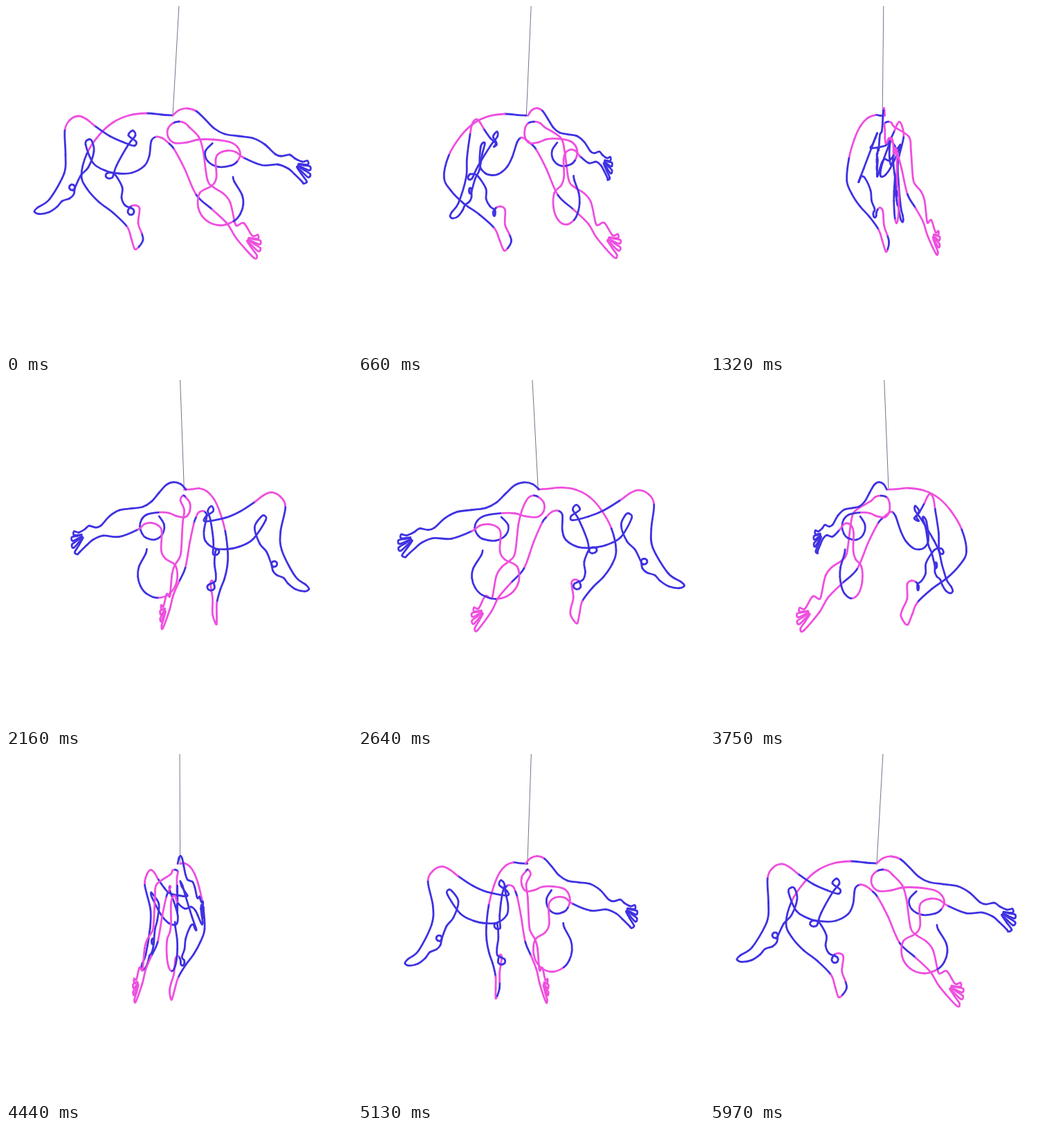
Recreate the animation shown at these times as an HTML page with a canvas. Size 500 px wide and 500 px high, loop 6000 ms.

```html
<!DOCTYPE html>
<html>
<head>
<meta charset="utf-8">
<style>
html, body { margin: 0; width: 100%; height: 100%; overflow: hidden; background: #fff; }
canvas { display: block; }
</style>
</head>
<body>
<canvas id="stage" width="500" height="500"></canvas>
<script>
const ctx = document.getElementById('stage').getContext('2d');
const LOOP = 6000, AXIS = 251, SWAY = 0.056;
const BLUE = '#4032e2', PINK = '#ef4fdf', ROPE = '#77738c';

// Colours seen from the front and from behind
const blue = [BLUE, BLUE], pink = [PINK, PINK];
const bluePink = [BLUE, PINK], pinkBlue = [PINK, BLUE];

// Each limb lies in a plane: its depth follows from its place in the front view.
const belly = x => Math.min(0, 0.26 * (x - 215));
const farLeg = (x, y) => 0.36 * (x - 155) + 0.14 * (y - 299) - 3;
const farAnkle = x => 0.7 * (181 - x);
const knees = (x, y) => 0.2 * (180 - x) + 0.4 * (190 - y);
const nearThigh = x => 61 - 0.5 * (x - 85);
const nearShin = x => 48 - 0.36 * (x - 99);
const nearAnkle = x => 49 - 0.5 * (x - 95);
const underThigh = (x, y) => 43 - 0.354 * (x - 127) - 0.4 * (y - 203);
const nearArm = x => 0.32 * (x - 180);
const ribs = x => 0.4 * (x - 233);
const torso = x => 5 - 0.07 * (x - 235);
const farArm = x => 0.25 * (255 - x);
const farForearm = x => 0.47 * (343 - x) - 2;
const face = x => 0.3 * (338 - x) - 1;

const wires = [];

function line(color, depth, ...xy) {
  const wire = wires[wires.length - 1];
  for (let i = 0; i < xy.length; i += 2) {
    const x = xy[i] - AXIS;
    wire.push({ x, y: xy[i + 1] - SWAY * x, z: depth(xy[i], xy[i + 1]), color });
  }
}

// Part of an ellipse, angles in degrees
function arc(color, depth, cx, cy, rx, ry, from, to) {
  const steps = Math.ceil(Math.abs(to - from) / 45);
  for (let i = 0; i <= steps; i++) {
    const a = (from + (to - from) * i / steps) * Math.PI / 180;
    line(color, depth, cx + rx * Math.cos(a), cy + ry * Math.sin(a));
  }
}

// Four fingers fanned out around the palm, the thumb first
function hand(color, depth, px, py, thumbLast) {
  const points = [];
  const add = (r, a) => points.push([px + r * Math.cos(a), py + r * Math.sin(a)]);
  for (let k = 0; k < 4; k++) {
    const angle = 0.36 * k - 0.03, length = 20 + 4.2 * k, half = 2.8 / length;
    add(length * 0.6, angle - half);
    add(length, angle - half);
    add(length, angle + half);
    if (k < 3) add(7, angle + 0.18);
  }
  if (thumbLast) points.reverse();
  for (const p of points) line(color, depth, ...p);
}

// Belly, legs, near arm, chest and head in one line
wires.push([]);
line(bluePink, belly, 241,158, 225,157, 203,155);
line(pink, belly, 178,158, 155,168, 135,186, 117,213);
line(blue, farLeg, 109,245, 117,264, 134,283, 155,299, 175,319);
line(pink, farLeg, 181,336, 186,351, 192,348);
line(bluePink, farLeg, 198,338, 196,328);
line(pink, farLeg, 191,314, 193,293, 187,288, 180,290);
arc(blue, farAnkle, 180.5,297, 4.5,4.8, 200,-80);
line(blue, farLeg, 172,288, 167,277, 168,262, 157,243);
arc(blue, knees, 149.5,245, 5.5,4.2, 250,0);
line(blue, knees, 160,230, 177,200, 187,187, 183,180, 177,187, 188,196, 185,202);
line(blue, nearThigh, 170,197, 150,188, 128,173);
line(pink, nearThigh, 117,164, 105,159, 92,165, 85,180);
line(blue, nearShin, 86,215, 84,242, 63,279, 46,291, 41,297, 48,300.5, 62,298,
  74,290, 81,282, 92,278, 98,272);
arc(blue, nearAnkle, 95.5,262, 4,4, 20,-320);
line(blue, nearShin, 108,245, 119,233, 127,210);
line(blue, underThigh, 124,195, 119,193, 115,200, 126,227, 144,238, 163,242, 182,241,
  200,231, 207,217, 210,195, 217,189);
line(pink, nearArm, 226,191, 236,199);
line(blue, nearArm, 243,207);
line(pink, nearArm, 258,235, 275,273);
line(blue, nearArm, 298,294);
line(pink, nearArm, 320,315, 333,336);
hand(pink, nearArm, 344,334, true);
line(pink, nearArm, 344,314, 335,317, 331,314, 324,284, 314,271, 300,262, 291,251,
  285,210, 279,190);
arc(pink, ribs, 250,183, 17,16, -30,-90);
line(blue, ribs, 241,169.5);
arc(pink, torso, 250,183, 17,16, -160,-250);
line(pink, torso, 262,197, 278,193, 300,193);
arc(pinkBlue, torso, 313,214, 25.5,19, -65,35);
arc(blue, torso, 313,214, 25.5,19, 60,235);

// Shoulder, far arm, face and hair in one line
wires.push([]);
line(pinkBlue, farArm, 241,158, 250,150.5, 262,148, 275,152);
line(blue, farArm, 288,164, 301,177, 316,185, 336,188, 357,191, 374,200, 389,214,
  398,217, 410,215, 417,220);
hand(blue, farArm, 416,227);
line(blue, farForearm, 428,254, 417,243, 408,235, 393,229, 370,230, 343,219);
line(pink, face, 332,211, 320,209, 308,213, 303,222, 304,248, 297,260);
arc(pink, face, 310,284, 33,33, 205,90);
line(pinkBlue, face, 329,311);
arc(blue, face, 310,284, 33,33, 30,-20);
line(blue, face, 330,254, 328,247);

function stroke(color, width, path) {
  ctx.strokeStyle = color;
  ctx.lineWidth = width;
  ctx.beginPath();
  path();
  ctx.stroke();
}

function draw(now) {
  const angle = now / LOOP * 2 * Math.PI;
  const cos = Math.cos(angle), sin = Math.sin(angle);
  const side = cos >= 0 ? 0 : 1;
  const project = p => {
    const x = p.x * cos + p.z * sin;
    return [AXIS + x, p.y + SWAY * cos * x];
  };

  ctx.fillStyle = '#fff';
  ctx.fillRect(0, 0, 500, 500);
  ctx.lineCap = 'round';

  stroke(ROPE, 1, () => {
    ctx.moveTo(AXIS - cos, -1);
    ctx.lineTo(...project(wires[0][0]));
  });

  for (const wire of wires) {
    const pts = wire.map(project);
    for (let i = 1; i < pts.length; i++) {
      // Catmull-Rom span as a Bezier curve
      const b = pts[i - 1], c = pts[i], a = pts[i - 2] || b, d = pts[i + 1] || c;
      stroke(wire[i].color[side], 2.8, () => {
        ctx.moveTo(...b);
        ctx.bezierCurveTo(
          b[0] + (c[0] - a[0]) / 6, b[1] + (c[1] - a[1]) / 6,
          c[0] - (d[0] - b[0]) / 6, c[1] - (d[1] - b[1]) / 6, ...c);
      });
    }
  }
}

let start;
function tick(now) {
  start ??= now;
  draw((now - start) % LOOP);
  requestAnimationFrame(tick);
}
draw(0);
requestAnimationFrame(tick);
</script>
</body>
</html>
```
